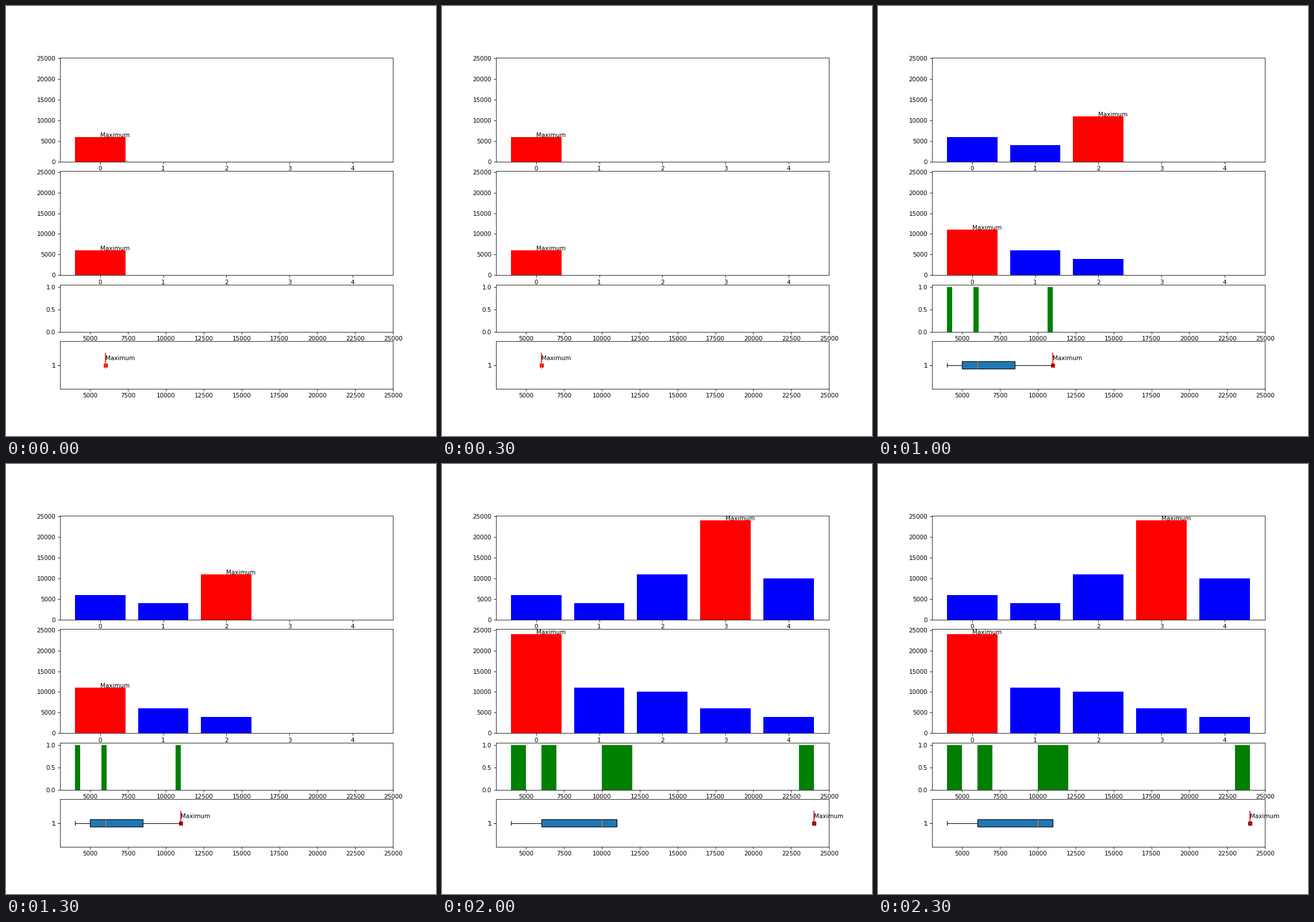
Write a matplotlib script that moves like this. It is 748 by 748 pixels and loops after 2500 ms.

```python
import matplotlib.pyplot as plt
from matplotlib.animation import ArtistAnimation

VALUES = [6000, 4000, 11000, 24000, 10000]

plt.rcParams["font.family"] = "DejaVu Sans"
plt.rcParams["font.size"] = 10

fig = plt.figure(figsize=(10, 10), dpi=74.8)
grid = fig.add_gridspec(6, 1, left=0.125, right=0.9, bottom=0.11, top=0.88,
                        hspace=0.2)
bar_ax = fig.add_subplot(grid[0:2])
sorted_ax = fig.add_subplot(grid[2:4])
hist_ax = fig.add_subplot(grid[4])
box_ax = fig.add_subplot(grid[5])


def draw_bars(ax, data):
    """Bars with the largest one in red and labelled."""
    peak = data.index(max(data))
    colors = ["red" if i == peak else "blue" for i in range(len(data))]
    bars = ax.bar(range(len(data)), data, color=colors)
    return [*bars, ax.text(peak, data[peak], "Maximum")]


def draw_hist(ax, data):
    _, _, patches = ax.hist(data, bins=20, color="green")
    return list(patches)


def draw_box(ax, data):
    """Horizontal box plot with a red pin at the maximum."""
    top = max(data)
    pin = ax.plot([top, top], [1, 1.25], color="red")
    pin += ax.plot([top], [1], "rs")
    # Repeated calls stack their tick at 1, which darkens the label.
    box = ax.boxplot(data, vert=False, patch_artist=True)
    parts = [artist for group in box.values() for artist in group]
    return pin + parts + [ax.text(top, 1.1, "Maximum")]


def draw_step(count):
    data = VALUES[:count]
    return (draw_bars(bar_ax, data)
            + draw_bars(sorted_ax, sorted(data, reverse=True))
            + draw_hist(hist_ax, data)
            + draw_box(box_ax, data))


steps = [draw_step(n + 1) for n in range(len(VALUES))]

for ax in (bar_ax, sorted_ax):
    ax.set(xlim=(-0.64, 4.64), ylim=(0, 25200))
hist_ax.set(xlim=(3000, 25000), ylim=(0, 1.05))
box_ax.set(xlim=(3000, 25000), ylim=(0.5, 1.5))

anim = ArtistAnimation(fig, steps, interval=500, repeat=True, repeat_delay=0)
plt.show()
```
